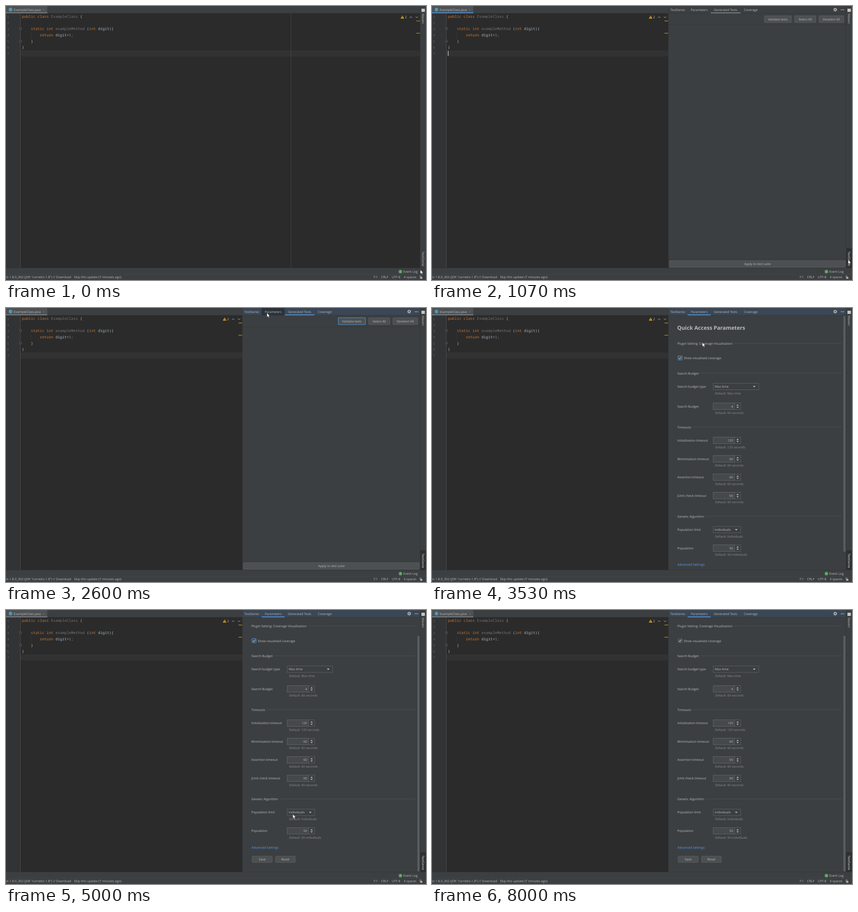
Recreate the animation shown at these times as an HTML page. Size 925 by 605 pixels, loop 8070 ms.

```html
<!DOCTYPE html>
<html lang="en">
<head>
<meta charset="utf-8">
<title>Test generation parameters</title>
<style>
html, body { margin: 0; width: 100%; height: 100%; overflow: hidden; background: #3c3f41; }
svg { display: block; width: 925px; height: 605px; }
text { font: 7px "Open Sans", "Noto Sans", sans-serif; fill: #bbb; white-space: pre; text-rendering: geometricPrecision; }
.small { font-size: 6.85px; }
.hint { font-size: 6.85px; fill: #8c8c8c; }
.title { font-size: 11.95px; font-weight: 700; }
.link { fill: #589df6; }
.mid { text-anchor: middle; }
.end { text-anchor: end; }
.code { font: 8.22px "Noto Sans Mono", "DejaVu Sans Mono", monospace; fill: #a9b7c6; }
.num { font: 7.4px "Noto Sans Mono", "DejaVu Sans Mono", monospace; fill: #606366; }
.kw { fill: #cc7832; }
.dim { fill: #72737a; }
.digit { fill: #6897bb; }
</style>
</head>
<body>
<svg id="stage" viewBox="0 0 925 605"></svg>
<script>
const BLUE = '#4a88c7', GREY = '#747a80', BAR = '#3c3f41', EDGE = '#323232';

const rect = (x, y, w, h, fill, more = '') =>
  `<rect x="${x}" y="${y}" width="${w}" height="${h}" fill="${fill}" ${more}/>`;
const box = (x, y, w, h, fill, stroke, r = 0, more = '') =>
  rect(x, y, w, h, fill, `stroke="${stroke}" stroke-width=".8" rx="${r}" ${more}`);
const text = (x, y, s, cls = '') => `<text x="${x}" y="${y}" class="${cls}">${s}</text>`;
const path = (d, stroke, fill = 'none', w = 1) =>
  `<path d="${d}" stroke="${stroke}" fill="${fill}" stroke-width="${w}"/>`;
const group = (id, body, more = '') => `<g id="${id}" ${more}>${body}</g>`;
const button = (x, y, w, h, label, more) =>
  box(x, y, w, h, '#4c5052', '#5e6060', 1.5, more) + text(x + w / 2, y + h / 2 + 2.5, label, 'mid');
const vertical = (y, s, id) => `<text id="${id}" transform="translate(915.6 ${y}) rotate(90)">${s}</text>`;

function editor() {
  const span = (cls, s) => `<tspan class="${cls}">${s}</tspan>`;
  const lines = [
    span('kw', 'public class ') + span('dim', 'ExampleClass') + ' {',
    '',
    '    ' + span('kw', 'static int ') + span('dim', 'exampleMethod') + ' (' + span('kw', 'int') + ' digit){',
    '        ' + span('kw', 'return') + ' digit+' + span('digit', '1') + span('kw', ';'),
    '    }',
    '}',
    ''
  ];
  const rows = lines.map((s, i) => {
    const y = 26.3 + 13.55 * i;
    return text(2.6, y + .3, i + 1, 'num') + text(35, y, s, 'code');
  }).join('');
  const fold = (y, d) => path(`M29.5 ${y - 2.5 * d}h5v${3.5 * d}l-2.5 ${2 * d}-2.5 ${-2 * d}zM30.8 ${y}h2.4`, '#5c5e60', '#313335', .7);
  return rect(0, 16, 912, 562.5, '#2b2b2b') + rect(0, 16, 31.5, 562.5, '#313335') +
    rect(32, 98, 880, 13.5, EDGE) + rect(31.2, 16, .8, 562.5, '#555') +
    rect(627, 16, .8, 562.5, '#4a4a4a') + rect(54.6, 57, .7, 14, '#3d3d3d') +
    rows + fold(50.5, 1) + fold(77, -1) +
    rect(35, 99, 1.2, 11, '#ddd', 'id="caret"');
}

function inspections() {
  return path('M873 21.5l3.3 6h-6.6z', '#d9a21b', '#d9a21b', .8) + rect(872.6, 23.2, .9, 2.2, '#2b2b2b') +
    rect(872.6, 26, .9, .9, '#2b2b2b') + text(878.4, 27, '2') +
    path('M889.3 26l2.5-2.5 2.5 2.5M902.3 23.5l2.5 2.5 2.5-2.5', '#bbb') +
    rect(903.5, 32.5, 8.5, 1.3, '#be9117') + rect(903.5, 59.5, 8.5, 1.3, '#be9117');
}

function frame() {
  return rect(0, 0, 925, 16, BAR) + rect(0, 15.6, 925, .7, EDGE) +
    rect(0, 0, 91, 16, '#4e5254') + rect(0, 14, 91, 2.2, GREY, 'id="fileLine"') +
    '<circle cx="10" cy="8" r="4.4" fill="#3d8fab"/>' + text(10, 10.3, 'C', 'mid small') +
    text(17, 10.8, 'ExampleClass.java') + path('M81.3 6.3l3.8 3.8m0-3.8l-3.8 3.8', '#6e7173', 'none', .7);
}

function surround() {
  return rect(912, 0, 13, 605, BAR) + rect(911.7, 0, .8, 579, EDGE) +
    rect(912.5, 535, 12.5, 43.5, '#2d2f30', 'id="stripe"') +
    rect(915, 6, 7.5, 7, '#c4c6c8') + vertical(17, 'Maven', 'maven') + vertical(542, 'TestGenie', 'genie') +
    rect(0, 578.5, 925, 26.5, BAR) + rect(0, 578.3, 925, .7, EDGE) + rect(0, 592.3, 925, .7, '#464849') +
    '<circle cx="868.6" cy="586.6" r="4" fill="#499c54"/>' + text(868.6, 588.9, '4', 'mid small') +
    text(875, 589.1, 'Event Log') +
    text(.5, 601.3, 'is 1.8.0_302 (JDK "corretto-1.8") // Download') +
    text(149.7, 601.3, 'Skip this update (7 minutes ago)') +
    text(809, 601.3, '7:1') + text(826, 601.3, 'CRLF') + text(849.7, 601.3, 'UTF-8') + text(876, 601.3, '4 spaces') +
    path('M911.2 598.5v-1.2a1.6 1.6 0 0 1 3.2 0v1.4', '#afb1b3') + rect(912, 598.4, 5, 3.8, '#afb1b3');
}

function header() {
  return rect(521, 0, 391, 16, BAR, 'id="head"') + rect(563, 0, 50.5, 16, '#2a323a', 'id="hover"') +
    rect(521, 15.8, 391, .7, EDGE) + rect(614, 14, 65.5, 2.3, GREY, 'id="tabLine"') +
    text(525, 10.8, 'TestGenie:', 'small') + text(570, 10.8, 'Parameters', 'small') +
    text(620.7, 10.8, 'Generated Tests', 'small') + text(687, 10.8, 'Coverage') +
    '<circle cx="888" cy="8" r="2.3" fill="none" stroke="#afb1b3" stroke-width="1.8"/>' +
    '<circle cx="888" cy="8" r="3.6" fill="none" stroke="#afb1b3" stroke-width="1.1" stroke-dasharray="1.885"/>' +
    rect(900, 7.8, 8, 1.1, '#afb1b3');
}

function generated() {
  return rect(521, 41, 391, .8, EDGE) + rect(521, 559.6, 391, .7, EDGE) +
    button(732, 21.5, 59.5, 15, 'Validate tests', 'id="validate"') +
    button(798.5, 21.5, 47, 15, 'Select All') + button(852, 21.5, 55, 15, 'Deselect All') +
    button(523, 562, 387.5, 15, 'Apply to test suite');
}

function parameters() {
  const section = (y, s, x) => text(540.3, y + 2.5, s) + rect(x, y - .9, 902.5 - x, .8, '#515456');
  const label = (y, s, hint) => text(540.3, y + 2.5, s) + text(623.5, y + 17.1, 'Default: ' + hint, 'hint');
  const combo = (y, s, hint, name, w) => label(y, name, hint) +
    box(619.3, y - 7.2, w, 14.3, BAR, '#646669') + text(622.7, y + 2.5, s) +
    path(`M${612.5 + w} ${y - 1.5}h-6l3 3.4z`, 'none', '#afb1b3');
  const spinner = (y, s, hint, name) => label(y, name, hint) +
    box(619.3, y - 7.2, 60.6, 14.3, BAR, '#646669') + box(619.3, y - 7.2, 47.2, 14.3, '#45494a', '#646669') +
    text(663, y + 2.5, s, 'end') +
    path(`M670.3 ${y - 1.2}h5.6l-2.8-3zM670.3 ${y + 1.2}h5.6l-2.8 3z`, 'none', '#afb1b3');
  const timeouts = ['Initialization', 'Minimisation', 'Assertion', 'JUnit check'].map((s, i) => {
    const sec = i ? 60 : 120;
    return spinner(292.4 + 40.6 * i, sec, sec + ' seconds', s + ' timeout');
  }).join('');
  return text(540, 47.8, 'Quick Access Parameters', 'title') +
    section(78.2, 'Plugin Setting: Coverage Visualisation', 665) +
    box(541.8, 105.8, 9, 9, '#43494a', '#6b6b6b', 1, 'id="check"') +
    path('M543.8 110.2l2 2.4 3.4-4.6', '#c4c6c8', 'none', 1.2) + text(554.4, 113.3, 'Show visualised coverage') +
    section(144.2, 'Search Budget', 589) +
    combo(173.4, 'Max time', 'Max time', 'Search budget type', 100.2) +
    spinner(217, 4, '60 seconds', 'Search Budget') +
    section(263, 'Timeouts', 572.5) + timeouts +
    section(460.2, 'Genetic Algorithm', 602) +
    combo(489.5, 'Individuals', 'Individuals', 'Population limit', 60.6) +
    spinner(530.2, 50, '50 individuals', 'Population') +
    text(540.8, 569.2, 'Advanced Settings', 'link') +
    button(542, 586, 44.5, 14, 'Save') + button(593.3, 586, 44, 14, 'Reset');
}

document.getElementById('stage').innerHTML =
  '<clipPath id="view"><rect x="521" y="17" width="390" height="561"/></clipPath>' +
  editor() + frame() + group('marks', inspections()) +
  group('panel',
    rect(520.4, 0, 392, 578.5, BAR) + rect(520.4, 0, .8, 578.5, EDGE) +
    header() + group('tests', generated()) +
    group('params', group('content', parameters()) + rect(906, 18, 4.8, 520, '#5a5d5f', 'id="thumb"'), 'clip-path="url(#view)"')) +
  surround() +
  group('mouse', path('M0 0v9l2.1-1.9 1.4 3.3 1.5-.7-1.4-3.1h2.8z', '#222', '#fff', .5));

const $ = Object.fromEntries([...document.querySelectorAll('[id]')].map(e => [e.id, e]));
const set = (e, attrs) => { for (const k in attrs) e.setAttribute(k, attrs[k]); };
const show = (e, on) => { e.style.display = on ? '' : 'none'; };

// time, x, y of the pointer tip
const route = [
  [0, 912.5, 582.5], [330, 915, 549], [530, 916.5, 560.5], [1070, 916.5, 560.5], [1800, 631, 209],
  [2600, 574.7, 11], [3200, 574.7, 11], [3330, 576, 13], [3400, 576, 13], [3900, 649, 250],
  [4270, 643, 413], [4460, 632.7, 444.7], [4735, 632.7, 444.7], [5000, 631.7, 451], [5330, 631.7, 456],
  [5600, 631.7, 456], [5730, 632.5, 463], [6065, 632.5, 463], [6330, 549, 605]
];

function pointer(t) {
  const i = route.findIndex(p => p[0] > t);
  if (i < 0) return null;
  const [a, b] = [route[i - 1], route[i]], k = (t - a[0]) / (b[0] - a[0]);
  return [a[1] + (b[1] - a[1]) * k, a[2] + (b[2] - a[2]) * k];
}

function draw(ms) {
  const t = Math.floor(ms * .015 + .05) / .015; // 15 pictures a second
  const editing = t > 990 && t < 1120, open = t > 1060, focus = t > 1120, settings = t > 2920;
  const at = pointer(t);

  show($.mouse, at);
  if (at) set($.mouse, { transform: `translate(${at})` });

  show($.caret, editing);
  set($.fileLine, { fill: editing ? BLUE : GREY });
  set($.marks, { transform: `translate(${open ? -391.5 : 0})` });
  show($.stripe, t > 990);
  $.genie.style.fill = open ? '#e4e4e4' : '#bbb';

  show($.panel, open);
  show($.tests, !settings);
  show($.params, settings);
  set($.head, { fill: focus ? '#3b4754' : BAR });
  show($.hover, at && at[0] > 563 && at[0] < 613.5 && at[1] < 16);
  set($.tabLine, { x: settings ? 563 : 614, width: settings ? 50.5 : 65.5, fill: focus ? BLUE : GREY });
  set($.validate, { stroke: focus ? '#4a7fb0' : '#5e6060', 'stroke-width': focus ? 1.6 : .8 });

  const k = Math.min(1, Math.max(0, (t - 4735) / 265)), scroll = k * (2 - k);
  set($.content, { transform: `translate(0 ${-42.6 * scroll})` });
  set($.thumb, { y: 18 + 39 * scroll });
  const ring = t < 7990;
  set($.check, { stroke: ring ? '#4a7fb0' : '#6b6b6b', 'stroke-width': ring ? 1.5 : .8 });
}

const start = performance.now();
function tick() {
  draw((performance.now() - start) % 8070);
  requestAnimationFrame(tick);
}
tick();
</script>
</body>
</html>
```
